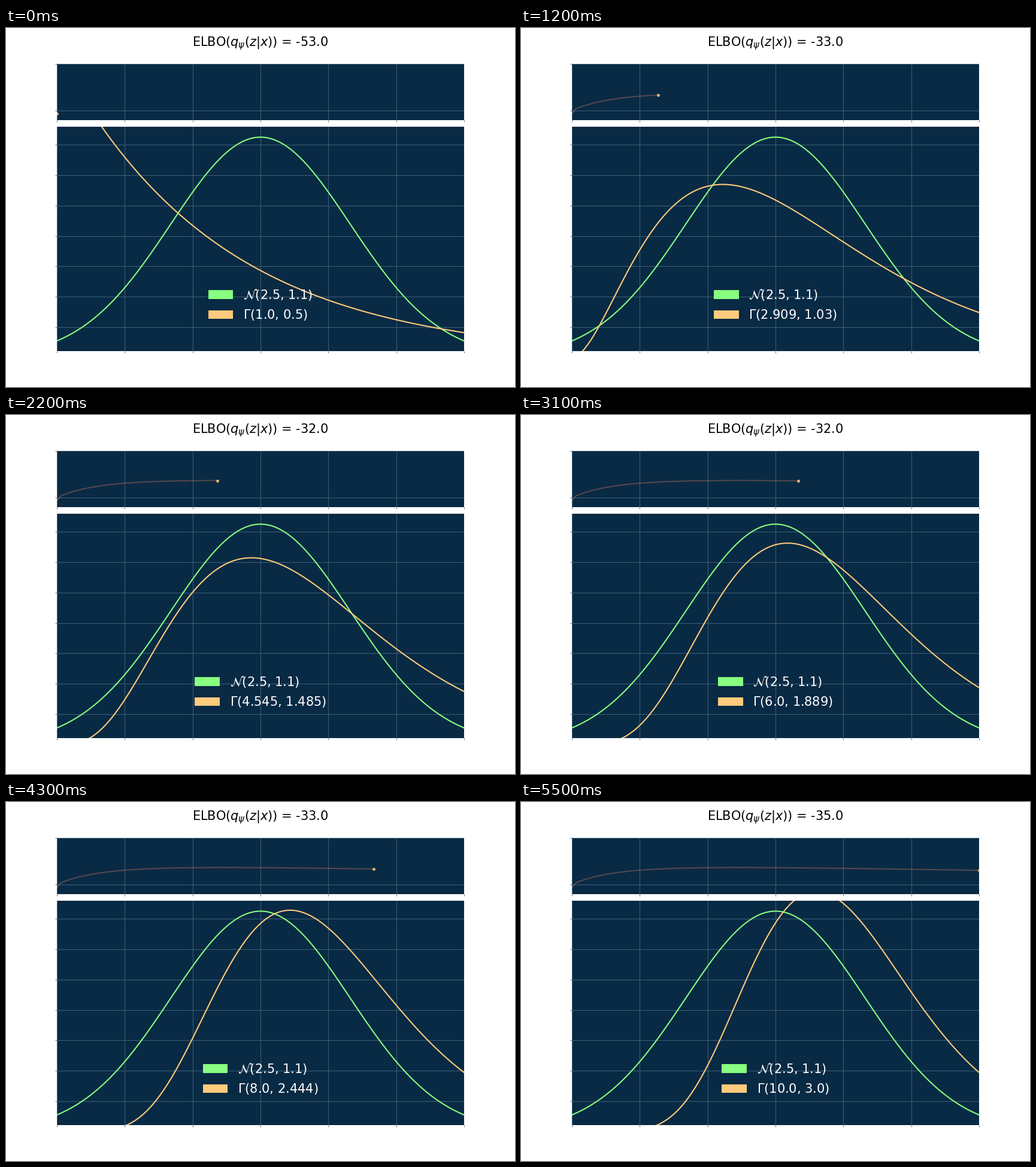
These frames come from a looping animation (850 by 600 pixels, 5.6 s). A matplotlib script:

```python
import math

import matplotlib.pyplot as plt
import numpy as np
from matplotlib.animation import FuncAnimation
from matplotlib.patches import Patch

FRAMES, INTERVAL, STEPS = 56, 100, 100
NAVY, GRID, TICK = "#092a44", "#3b5c75", "#6b7680"
GREEN, ORANGE, TRACE = "#88ff80", "#ffcb7c", "#ff8a70"
MEAN, SIGMA = 2.5, 1.1

shapes = np.linspace(1, 10, STEPS)
rates = np.linspace(0.5, 3, STEPS)
z = np.linspace(0, 5, 100)


def normal_pdf(x):
    return np.exp(-((x - MEAN) / SIGMA) ** 2 / 2) / (SIGMA * math.sqrt(2 * math.pi))


def gamma_pdf(x, a, b):
    return x ** (a - 1) * np.exp(-b * x) * b ** a / math.gamma(a)


def elbo_curve(i):
    rise = 13.7 * np.exp(-i / 16) + 8.4 * np.exp(-i / 7)
    values = -27.77 - 0.07 * i - rise
    values[0] = -53.0
    return values


steps = np.arange(STEPS)
elbo = elbo_curve(steps)

plt.rcParams["font.family"] = "DejaVu Sans"
fig, (top, main) = plt.subplots(
    2, 1, figsize=(8.5, 6), dpi=100,
    gridspec_kw=dict(left=0.1, right=0.9, bottom=0.1, top=0.9,
                     hspace=0.05, height_ratios=[1, 4]))
fig.patch.set_facecolor("white")


def style(ax, xmax, ylim, yticks):
    ax.set_facecolor(NAVY)
    ax.set_xlim(0, xmax)
    ax.set_ylim(*ylim)
    ax.set_xticks(np.linspace(0, xmax, 7))
    ax.set_yticks(yticks)
    ax.set_axisbelow(True)
    ax.grid(color=GRID, lw=0.8)
    ax.tick_params(length=2, width=0.8, color=TICK,
                   labelbottom=False, labelleft=False)
    for spine in ax.spines.values():
        spine.set_visible(False)


bell = normal_pdf(z)
low, high = normal_pdf(0.0), normal_pdf(MEAN)
pad = 0.05 * (high - low)
style(top, STEPS - 1, (-60, 0), [-50, 0])
style(main, 5, (low - pad, high + pad), np.arange(1, 8) * 0.05)

main.plot(z, bell, color=GREEN, lw=1.5)
curve, = main.plot([], [], color=ORANGE, lw=1.5)
trace, = top.plot([], [], color=TRACE, lw=1.5, alpha=0.3)
dot, = top.plot([], [], "o", color=ORANGE, ms=3.6, mew=0, alpha=0.85)
title = fig.suptitle("", fontsize=15, color="black")
swatches = [Patch(facecolor=GREEN, edgecolor="none"),
            Patch(facecolor=ORANGE, edgecolor="none")]


def draw(frame):
    i = frame * 9 // 5
    a, b = shapes[i], rates[i]
    curve.set_data(z, gamma_pdf(z, a, b))
    trace.set_data(steps[:i + 1], elbo[:i + 1])
    dot.set_data([i], [elbo[i]])
    title.set_text(rf"ELBO($q_\psi(z|x)$) = {float(round(elbo[i]))}")
    labels = [rf"$\mathcal{{N}}$({MEAN}, {SIGMA})",
              rf"$\Gamma$({round(float(a), 3)}, {round(float(b), 3)})"]
    main.legend(swatches, labels, loc="lower center", frameon=False,
                fontsize=15, labelcolor="white",
                bbox_to_anchor=(0.5, 0.15), bbox_transform=fig.transFigure)
    return curve, trace, dot, title


anim = FuncAnimation(fig, draw, frames=FRAMES, interval=INTERVAL,
                     init_func=lambda: draw(0), repeat=True, repeat_delay=0)
plt.show()
```
